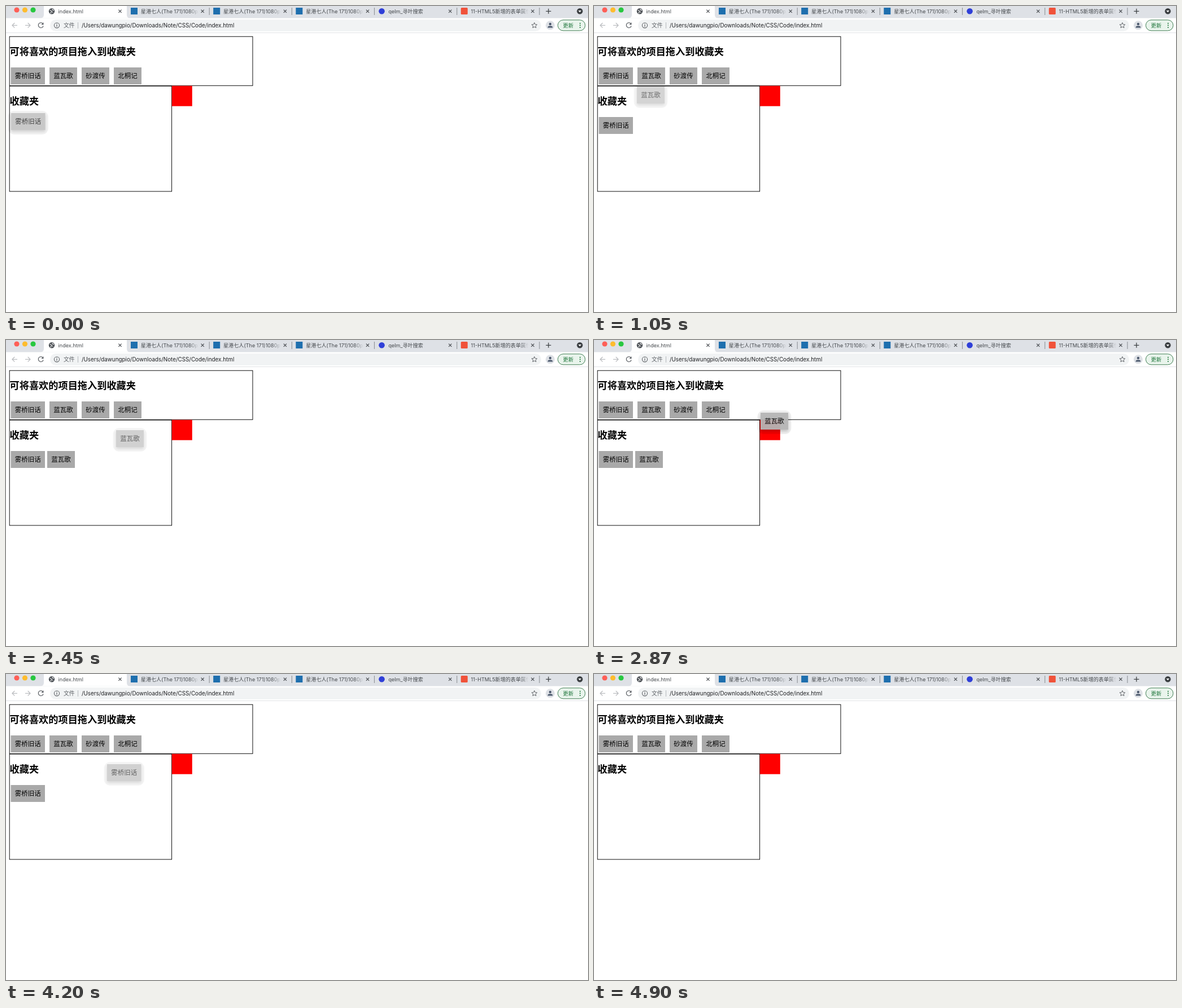
These frames come from a looping animation (1031x543 px, 5390 ms). An HTML page:

```html
<!DOCTYPE html>
<html lang="zh-CN">
<head>
<meta charset="utf-8">
<title>index.html</title>
<style>
  html, body { margin: 0; width: 100%; height: 100%; overflow: hidden; background: #fff; }
  svg { display: block; width: 1031px; height: 543px; }
  text { font-family: Inter, "Noto Sans CJK SC", "Noto Sans CJK", sans-serif; }
  .tab { font-size: 9.1px; fill: #45494d; }
  .bar { font-size: 9.85px; }
  .head { font-size: 17.2px; font-weight: 700; }
  .item { font-size: 11.5px; font-weight: 500; }
  .line { fill: none; stroke: #5f6368; stroke-width: 1.3; }
  .box { fill: none; stroke: #000; stroke-width: .95; }
  .shade { filter: blur(2.5px); fill-opacity: .2; }
</style>
</head>
<body>
<svg viewBox="0 0 1031 543">
  <defs>
    <linearGradient id="fade">
      <stop offset=".84" stop-color="#fff"/>
      <stop offset="1" stop-color="#fff" stop-opacity="0"/>
    </linearGradient>
    <mask id="clip" maskUnits="userSpaceOnUse" x="0" y="-12" width="102" height="30">
      <rect y="-12" width="102" height="30" fill="url(#fade)"/>
    </mask>
    <path id="close" d="M-2.6-2.6l5.2 5.2m0-5.2l-5.2 5.2" stroke="#45494d" stroke-width="1.2"/>
  </defs>

  <rect width="1031" height="21.5" fill="#dee1e6"/>
  <path d="M61 21.5q6 0 6-6V0h147v15.5q0 6 6 6z" fill="#fff"/>
  <circle cx="19" cy="7" r="4.6" fill="#fe5f57"/>
  <circle cx="33.5" cy="7" r="4.6" fill="#febc2e"/>
  <circle cx="48" cy="7" r="4.6" fill="#28c840"/>
  <circle cx="81" cy="9.3" r="5.2" fill="#4d5156"/>
  <path d="M77.5 7.5q2.5 0 3 1.8t3 1.7M82 5.5q0 2 3 2M79 13q1-1 .5-2.5" fill="none" stroke="#fff" stroke-width="1.2"/>
  <g id="tabs"></g>
  <path d="M956.5 9.3h9M961 4.8v9" class="line" style="stroke:#3c4043"/>
  <circle cx="1016.5" cy="9.3" r="5.2" fill="#3c4043"/>
  <path d="M1013.8 8h5.4l-2.7 3.2z" fill="#fff"/>

  <rect x="78" y="24" width="870" height="21" rx="10.5" fill="#f1f3f4"/>
  <path d="M0 47.5h1031" stroke="#e1e3e6"/>
  <path d="M20 34.3h-9m4.3-4.3l-4.3 4.3 4.3 4.3M34 34.3h9m-4.3-4.3l4.3 4.3-4.3 4.3" class="line" style="stroke:#bcbec1"/>
  <path d="M65.3 31.2a4.5 4.5 0 1 0 .8 4.3" class="line"/>
  <path d="M66.5 29v4.2h-4.2z" fill="#5f6368"/>
  <circle cx="90" cy="34.3" r="4.6" class="line" style="stroke-width:1.1"/>
  <path d="M90 33.5v3.3M90 31.3v1.2" class="line"/>
  <text class="bar" x="102" y="38" fill="#5f6368">文件</text>
  <path d="M127.5 29v11" stroke="#b5b8bc"/>
  <text class="bar" x="134" y="37.8" fill="#202124">/Users/dawungpio/Downloads/Note/CSS/Code/index.html</text>
  <path d="M936 29.5l1.4 3.2 3.5.3-2.7 2.3.8 3.4-3-1.8-3 1.8.8-3.4-2.7-2.3 3.5-.3z" class="line" style="stroke-width:1"/>
  <circle cx="964" cy="34.3" r="8" fill="#dee1e6"/>
  <circle cx="964" cy="32" r="2.2" fill="#4d5a6e"/>
  <path d="M959.5 38.6q0-3.3 4.5-3.3t4.5 3.3z" fill="#4d5a6e"/>
  <rect x="977.5" y="24.8" width="48.5" height="19" rx="9.5" fill="#e9f4ec" stroke="#3f7d52"/>
  <text x="986.5" y="37.8" font-size="9.4" font-weight="500" fill="#1a7337">更新</text>
  <g fill="#1a7337">
    <circle cx="1017" cy="30.7" r="1"/><circle cx="1017" cy="34.3" r="1"/><circle cx="1017" cy="37.9" r="1"/>
  </g>

  <rect class="box" x="6.2" y="54.2" width="430.8" height="87.1"/>
  <rect class="box" x="6.2" y="142.1" width="287.4" height="186.9"/>
  <rect x="293.8" y="141.7" width="36" height="36" fill="red"/>
  <text class="head" x="6.5" y="87">可将喜欢的项目拖入到收藏夹</text>
  <text class="head" x="6.5" y="175">收藏夹</text>
  <g id="list"></g>
  <g id="kept"></g>
  <g id="drag"></g>
</svg>
<script>
const $ = id => document.getElementById(id);
const names = ["雾桥旧话", "蓝瓦歌", "砂渡传", "北桐记"];
const STEP = 70, LOOP = 5390;

const show = "星港七人(The 911)1080p".replace("911", "171");
const blueSquare = '<rect x="7" y="3" width="12" height="12" fill="#1e6fae"/>';
const tabs = [
  ["", "index.html"],
  [blueSquare, show], [blueSquare, show], [blueSquare, show],
  ['<circle cx="13" cy="9.3" r="5.3" fill="#2f3fd8"/>', "qelm_寻叶搜索"],
  ['<rect x="7" y="3" width="12" height="12" rx="1.5" fill="#f0523a"/>', "11-HTML5新增的表单属性"]
];
$("tabs").innerHTML = tabs.map(([icon, title], i) => `
  <g transform="translate(${67.8 + i * 146.2})">
    ${icon}
    <g transform="translate(24.8 12.5)"><text class="tab" mask="url(#clip)">${title}</text></g>
    <use href="#close" x="134.2" y="9.3"/>
    ${i ? '<path d="M146.2 3v13" stroke="#85898e"/>' : ""}
  </g>`).join("");

const width = name => name.length * 11.5 + 14.5;
const item = (name, x, y, fill = "#a9a9a9", under = "") => `
  <g transform="translate(${x} ${y})">${under}
    <rect width="${width(name)}" height="30" fill="${fill}"/>
    <text class="item" x="7.3" y="19.4">${name}</text>
  </g>`;
const halo = name => `
  <rect x="-5.5" y="-4" width="${width(name) + 11}" height="42" rx="11" fill-opacity=".07"/>
  <rect class="shade" y="3" width="${width(name)}" height="30"/>`;
const ghost = name => `<g>${item(name, 0, 0, "#b5b5b5", halo(name))}</g>`;

$("list").innerHTML = [8.5, 77, 134, 191].map((x, i) => item(names[i], x, 109)).join("");
$("kept").innerHTML = item(names[0], 8.5, 197) + item(names[1], 73, 197);

// Each key: time, x, y, opacity
const drags = [
  { name: names[0], end: 420, keys: [[0, 9, 190, .74], [210, 9, 199, .95]] },
  { name: names[1], end: 1750, keys: [[980, 77, 122, .5], [1050, 76, 143, .57], [1260, 75, 178, .8], [1470, 74, 190, .95], [1680, 74, 193, .95]] },
  { name: names[1], end: 3150, keys: [[2380, 132, 179, .53], [2450, 195, 160, .61], [2660, 285, 133, .83], [2870, 295, 129, .95]] },
  { name: names[0], end: 4900, keys: [[4130, 95, 179, .53], [4200, 179, 160, .61], [4410, 270, 139, .83], [4620, 290, 135, .95]] }
];
$("drag").innerHTML = drags.map(d => ghost(d.name)).join("");

function pose(keys, t) {
  const next = keys.findIndex(k => k[0] > t);
  if (next < 0) return keys[keys.length - 1].slice(1);
  const a = keys[next - 1], b = keys[next];
  const p = (t - a[0]) / (b[0] - a[0]);
  return a.slice(1).map((v, i) => v + (b[i + 1] - v) * p);
}

const toggle = (el, on) => { el.style.display = on ? "" : "none"; };
const kept = $("kept").children, ghosts = $("drag").children;
const start = performance.now();

function draw() {
  const now = (performance.now() - start) % LOOP;
  const t = Math.floor(now / STEP) * STEP;
  toggle(kept[0], t >= 420 && t < 4900);
  toggle(kept[1], t >= 1750 && t < 3150);
  drags.forEach(({ keys, end }, i) => {
    const on = t >= keys[0][0] && t < end;
    toggle(ghosts[i], on);
    if (!on) return;
    const [x, y, alpha] = pose(keys, t);
    ghosts[i].setAttribute("transform", `translate(${x} ${y})`);
    ghosts[i].setAttribute("opacity", alpha);
  });
  requestAnimationFrame(draw);
}
draw();
</script>
</body>
</html>
```
